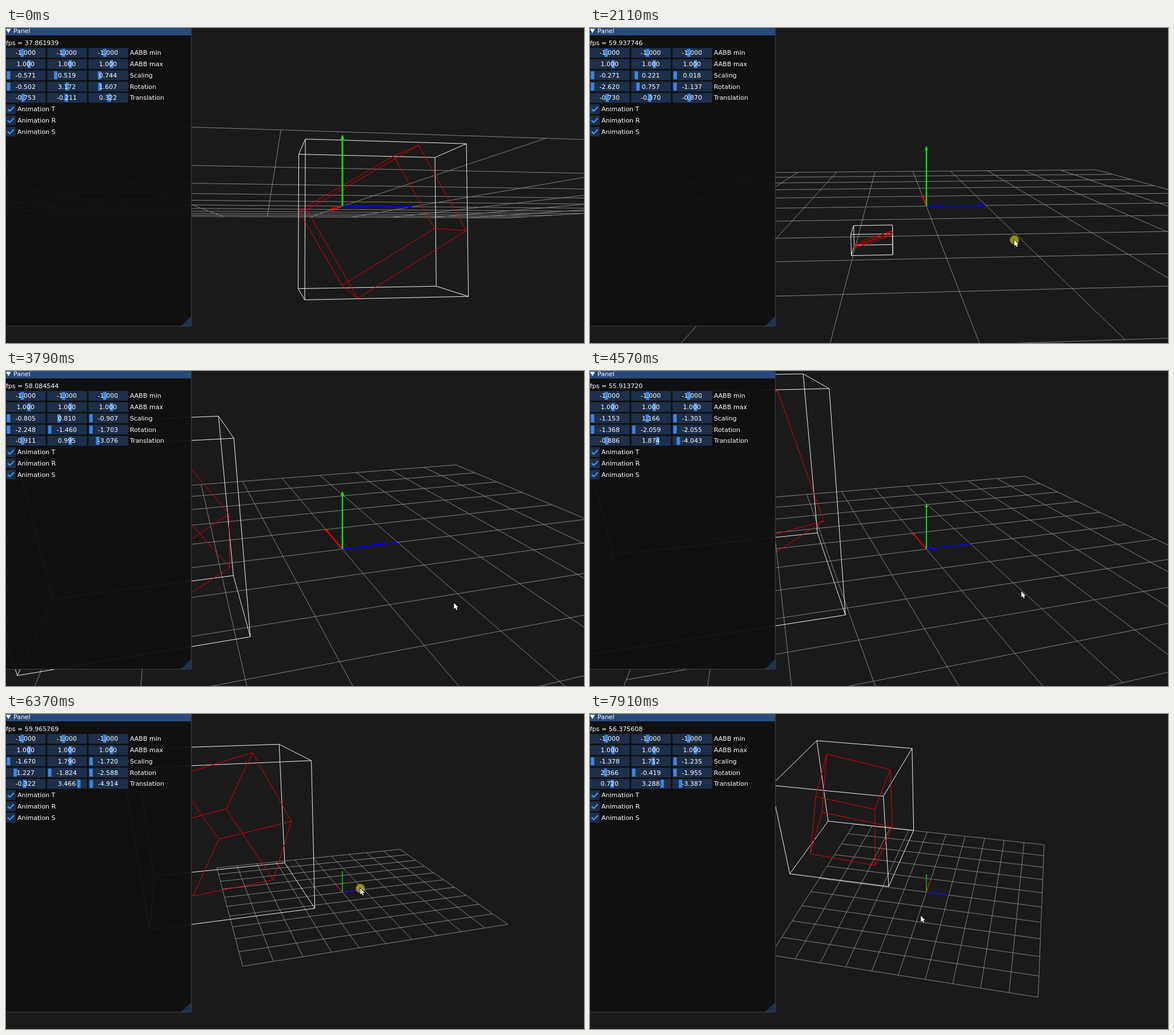
Animation, 1012 px wide and 553 px high, one loop 8000 ms. Source, as an HTML page with a canvas:

```html
<!DOCTYPE html>
<html lang="en">
<head>
<meta charset="utf-8">
<title>Panel</title>
<style>
html, body { margin: 0; width: 100%; height: 100%; overflow: hidden; background: #1a1a1a; }
canvas, svg { position: absolute; left: 0; top: 0; width: 1012px; height: 553px; display: block; }
text { font: 11px "DejaVu Sans", sans-serif; fill: #fff; white-space: pre; }
</style>
</head>
<body>
<canvas id="scene" width="1012" height="553"></canvas>
<svg id="panel" viewBox="0 0 1012 553"></svg>
<script>
const LOOP = 8000, STEP = 111.5;
const CX = 589, CY = 312.8, FOCAL = 865, NEAR = 0.1;
const ctx = document.getElementById('scene').getContext('2d');
const svg = document.getElementById('panel');

// Key points: ms, fps, scaling xyz, rotation xyz, translation xyz
const KEYS = [
  [0, 37.861939, -0.571, 0.519, 0.744, -0.502, 3.172, 1.607, -0.753, -0.211, 0.322],
  [890, 58.298259, -0.357, 0.269, 0.472, -1.692, 2.067, -0.046, -0.722, -0.376, -0.041],
  [2110, 59.937746, -0.271, 0.221, 0.018, -2.620, 0.757, -1.137, -0.730, -0.370, -0.870],
  [3790, 58.084544, -0.805, 0.810, -0.907, -2.248, -1.460, -1.703, -0.911, 0.995, -3.076],
  [5350, 54.662278, -1.485, 1.515, -1.620, -0.248, -2.341, -2.390, -0.768, 2.751, -4.813],
  [6370, 59.965769, -1.670, 1.790, -1.720, 1.227, -1.824, -2.588, -0.322, 3.466, -4.914],
  [7910, 56.375608, -1.378, 1.712, -1.235, 2.366, -0.419, -1.955, 0.720, 3.288, -3.387]];

// User input as [from ms, to ms, change...]
const DRAGS = [[890, 1790, -2.9, 7], [1790, 2000, -1.9, 6.7], [2110, 3200, 13.8, 11.7],
  [6370, 7150, 10.1, 9.8], [7150, 7800, -39.8, 5.9]];                  // yaw, pitch in degrees
const HOVERS = [[300, 700, -29, -149], [2000, 2110, -25.6, -41],
  [4450, 5300, -206, -145], [5600, 6200, 42, 44], [7800, 7910, 48, 1]]; // pixels
const ZOOMS = [[500, 650, 1], [2000, 2100, 0.95], [4100, 4900, 4.2], [4900, 5350, 4.7],
  [5350, 5600, -1.1], [5600, 6250, 2.45]];                              // wheel notches
const PX_PER_DEGREE = 3;

const clamp01 = v => Math.min(1, Math.max(0, v));
const total = (moves, t, k = 0) =>
  moves.reduce((sum, m) => sum + m[k + 2] * clamp01((t - m[0]) / (m[1] - m[0])), 0);

// Even picture steps between neighbouring key times
function snap(t) {
  const i = KEYS.findLastIndex(k => k[0] <= t), a = KEYS[i][0];
  const span = (KEYS[i + 1] || [LOOP])[0] - a, n = Math.round(span / STEP);
  return a + span * Math.floor((t - a) / span * n + 1e-6) / n;
}

// Smooth curve through the key points
function valuesAt(t) {
  const last = KEYS.length - 1;
  const i = Math.min(last - 1, KEYS.findLastIndex(k => k[0] <= t));
  const span = KEYS[i + 1][0] - KEYS[i][0], u = clamp01((t - KEYS[i][0]) / span);
  const slope = (k, j) => {
    const a = KEYS[Math.max(0, k - 1)], b = KEYS[Math.min(last, k + 1)];
    return (b[j] - a[j]) / (b[0] - a[0]) * span;
  };
  return KEYS[i].slice(1).map((p, k) => {
    const j = k + 1, d = KEYS[i + 1][j] - p, m = slope(i, j), n = slope(i + 1, j);
    return p + u * (m + u * (3 * d - 2 * m - n + u * (m + n - 2 * d)));
  });
}

// ---- 3D ----
let cam;
function setCamera(t) {
  const a = (8.9 + total(DRAGS, t)) * Math.PI / 180, b = (total(DRAGS, t, 1) - 3) * Math.PI / 180;
  const c = Math.cos(a), s = Math.sin(a), cp = Math.cos(b), sp = Math.sin(b);
  cam = { r: [-s, 0, c], u: [c * sp, cp, s * sp], f: [c * cp, -sp, s * cp],
    dist: 6.81 * 1.1 ** total(ZOOMS, t) };
}
const dot = (a, b) => a[0] * b[0] + a[1] * b[1] + a[2] * b[2];
const view = p => [dot(p, cam.r), dot(p, cam.u), dot(p, cam.f) + cam.dist];
const toScreen = ([x, y, w]) => [CX + FOCAL * x / w, CY - FOCAL * y / w];
const project = p => toScreen(view(p));

function segment(p, q) {
  let a = view(p), b = view(q);
  if (a[2] > b[2]) [a, b] = [b, a];
  if (b[2] < NEAR) return;
  if (a[2] < NEAR) {
    const k = (NEAR - a[2]) / (b[2] - a[2]);
    a = a.map((v, i) => v + (b[i] - v) * k);
  }
  ctx.moveTo(...toScreen(a));
  ctx.lineTo(...toScreen(b));
}

function strokeLines(color, width, build) {
  ctx.strokeStyle = color;
  ctx.lineWidth = width;
  ctx.beginPath();
  build();
  ctx.stroke();
}

function drawGrid() {
  strokeLines('#828282', 1, () => {
    for (let i = -5; i <= 5; i++) {
      segment([i, 0, -5], [i, 0, 5]);
      segment([-5, 0, i], [5, 0, i]);
    }
  });
}

// Rotate about y, then z, then x
function rotate([x, y, z], [a, b, g]) {
  const turn = (p, q, t) => [p * Math.cos(t) - q * Math.sin(t), p * Math.sin(t) + q * Math.cos(t)];
  [z, x] = turn(z, x, b);
  [x, y] = turn(x, y, g);
  [y, z] = turn(y, z, a);
  return [x, y, z];
}

const CORNERS = Array.from({ length: 8 }, (_, i) => [0, 1, 2].map(k => i >> k & 1 ? 1 : -1));

function drawBox(color, points) {
  strokeLines(color, 1, () => {
    for (let i = 0; i < 8; i++)
      for (let k = 0; k < 3; k++)
        if (!(i >> k & 1)) segment(points[i], points[i | 1 << k]);
  });
}

function drawBoxes(pose) {
  const scale = pose.slice(0, 3), angle = pose.slice(3, 6), move = pose.slice(6);
  const solid = CORNERS.map(c => rotate(c.map((v, k) => v * scale[k]), angle).map((v, k) => v + move[k]));
  const half = move.map((m, k) => Math.max(...solid.map(p => p[k])) - m);
  drawBox('#f4f4f4', CORNERS.map(c => c.map((v, k) => move[k] + v * half[k])));
  drawBox('#ea0000', solid);
}

function drawAxis(dir, color) {
  const base = dir.map(v => v * 0.935), unit = FOCAL / view(dir)[2];
  const [bx, by] = project(base), [tx, ty] = project(dir);
  const angle = Math.atan2(by - CY, bx - CX), r = 0.028 * unit;
  const nx = -Math.sin(angle) * r, ny = Math.cos(angle) * r;
  strokeLines(color, Math.max(1.3, 0.023 * unit), () => segment([0, 0, 0], base));
  ctx.fillStyle = color;
  ctx.beginPath();
  ctx.ellipse(bx, by, r * Math.abs(dot(dir, cam.f)), r, angle, 0, 7);
  ctx.fill();
  ctx.beginPath();
  ctx.moveTo(tx, ty);
  ctx.lineTo(bx + nx, by + ny);
  ctx.lineTo(bx - nx, by - ny);
  ctx.fill();
}

const ARROW = new Path2D('M0 0V10.6L2.5 8.4L4.2 12.3L6 11.5L4.3 7.7H7.6Z');
function drawPointer(t) {
  if (t < HOVERS[0][0]) return;
  const at = (from, k) => from + total(HOVERS, t, k) + PX_PER_DEGREE * total(DRAGS, t, k);
  ctx.save();
  ctx.translate(at(812, 0), at(521, 1));
  if (DRAGS.some(([from, to]) => t >= from && t < to)) {
    ctx.fillStyle = 'rgba(255,255,0,.5)';
    ctx.beginPath();
    ctx.arc(0, 0, 8, 0, 7);
    ctx.fill();
  }
  ctx.lineWidth = 1.2;
  ctx.strokeStyle = '#000';
  ctx.stroke(ARROW);
  ctx.fillStyle = '#fff';
  ctx.fill(ARROW);
  ctx.restore();
}

// ---- panel ----
function add(tag, attrs, content) {
  const el = document.createElementNS('http://www.w3.org/2000/svg', tag);
  for (const k in attrs) el.setAttribute(k, attrs[k]);
  if (content) el.textContent = content;
  return svg.appendChild(el);
}
const rect = (x, y, width, height, fill) => add('rect', { x, y, width, height, fill });
const label = (x, y, s, anchor = 'start') => add('text', { x, y, 'text-anchor': anchor }, s);
const rowY = i => 43.6 + 19.75 * i;
const textY = i => Math.round(rowY(i) + 3.8);

rect(0, 0, 324.5, 523.5, 'rgba(15,15,15,.94)');
rect(0, 0, 324.5, 13, '#294a7a');
add('path', { d: 'M0 1.5H8.6L4.3 9Z', fill: '#fff' });
label(13, 9, 'Panel');
add('path', { d: 'M324 506V523H307Z', fill: '#1c3252' });
add('path', { d: 'M324.5 0V523.5H0', fill: 'none', stroke: '#3e3e44' });
const fpsText = label(0, 30, 'fps');

const ROWS = [['AABB min', -5, 5], ['AABB max', -5, 5], ['Scaling', 0, 3],
  ['Rotation', 0, 2 * Math.PI], ['Translation', -5, 5]];
const sliders = [];
ROWS.forEach(([name, lo, hi], i) => {
  const y = rowY(i);
  for (let k = 0; k < 3; k++) {
    const x = 72.2 * k;
    rect(x, y - 8.5, 69.5, 17, '#1d2f49');
    const grab = rect(x, y - 7, 6, 14, '#3d85e0');
    sliders.push({ x, lo, hi, grab, text: label(x + 34.2, textY(i), '', 'middle') });
  }
  label(217, textY(i), name);
});
[...'TRS'].forEach((c, i) => {
  const y = rowY(5 + i);
  rect(0, y - 8.5, 17, 17, '#1d2f49');
  add('path', { d: `M3 ${y}l3.6 3.6l7.2 -7.4`, fill: 'none', stroke: '#4296fa', 'stroke-width': 2.2 });
  label(20, textY(5 + i), 'Animation ' + c);
});

function updatePanel(fps, pose) {
  fpsText.textContent = 'fps = ' + fps.toFixed(6);
  [-1, -1, -1, 1, 1, 1, ...pose].forEach((v, i) => {
    const s = sliders[i];
    s.grab.setAttribute('x', s.x + 1.5 + 60 * clamp01((v - s.lo) / (s.hi - s.lo)));
    s.text.textContent = v.toFixed(3);
  });
}

function render(t) {
  const [fps, ...pose] = valuesAt(t);
  setCamera(t);
  ctx.fillStyle = '#1a1a1a';
  ctx.fillRect(0, 0, 1012, 553);
  drawGrid();
  drawBoxes(pose);
  drawAxis([1, 0, 0], '#f50000');
  drawAxis([0, 0, 1], '#0000fa');
  drawAxis([0, 1, 0], '#00e60a');
  drawPointer(t);
  updatePanel(fps, pose);
}

const start = performance.now();
let shown = -1;
function tick() {
  const t = snap((performance.now() - start) % LOOP);
  if (t !== shown) render(shown = t);
  requestAnimationFrame(tick);
}
tick();
</script>
</body>
</html>
```
